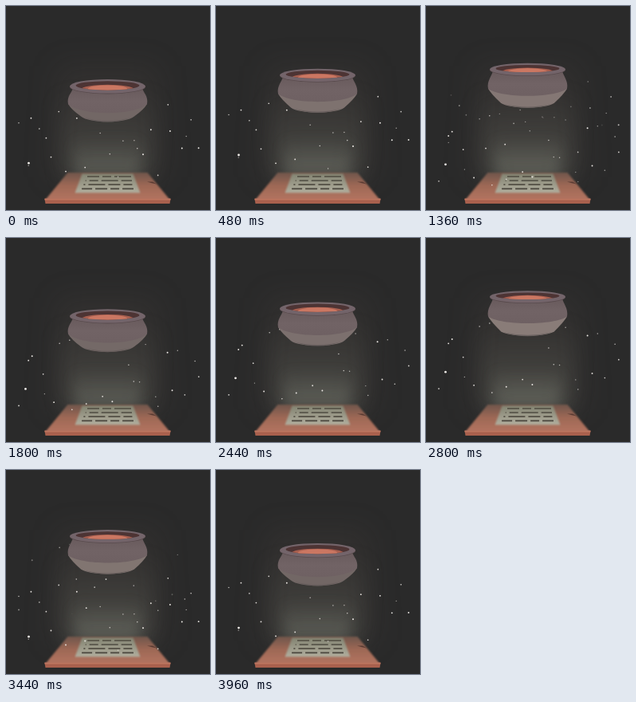
An HTML page with a canvas that plays this animation: 256 by 256 pixels, repeating every 4000 ms.

```html
<!DOCTYPE html>
<html lang="en">
<head>
<meta charset="utf-8">
<title>Floating pot</title>
<style>
html, body { margin: 0; width: 100%; height: 100%; overflow: hidden; background: #2a2a2a; }
canvas { display: block; width: 100vw; height: 100vh; }
</style>
</head>
<body>
<canvas id="stage" width="256" height="256"></canvas>
<script>
const ctx = document.getElementById('stage').getContext('2d');
const LOOP = 4000, STEP = 40, CX = 127.5;
const RISE = 21.3 / 1000; // spark speed in px per ms
const TAU = Math.PI * 2;

const lerp = (a, b, k) => a + (b - a) * k;
const clamp = v => Math.max(0, Math.min(1, v));
const mix = (a, b, k) => `rgb(${a.map((v, i) => Math.round(lerp(v, b[i], k)))})`;

function seeded(seed) {
  return () => {
    seed = (seed * 1664525 + 1013904223) >>> 0;
    return seed / 2 ** 32;
  };
}

// One bright leader, the rest spread evenly across the stage at random heights.
function makeSwarm(birth, seed, leaderX, leaderY, count = 28) {
  const rand = seeded(seed);
  const dots = Array.from({ length: count }, (_, i) => ({
    x: 14 + (i + rand()) * 232 / count,
    y: lerp(142, 236, rand()),
    size: lerp(0.65, 1, rand()),
    late: rand()
  }));
  dots.push({ x: leaderX, y: leaderY, size: 1.4, late: 0 });
  return { birth, dots };
}
const swarms = [makeSwarm(3000, 11, 28.5, 218.5), makeSwarm(1000, 29, 24.5, 206.5)];

function poly(fill, ...p) {
  ctx.beginPath();
  for (let i = 0; i < p.length; i += 2) ctx.lineTo(p[i], p[i + 1]);
  ctx.closePath();
  ctx.fillStyle = fill;
  ctx.fill();
}

// A symmetric trapezoid around the centre line.
function slab(fill, y0, half0, y1, half1) {
  poly(fill, CX - half0, y0, CX + half0, y0, CX + half1, y1, CX - half1, y1);
}

function ellipse(y, rx, ry, fill) {
  ctx.beginPath();
  ctx.ellipse(CX, y, rx, ry, 0, 0, TAU);
  ctx.fillStyle = fill;
  ctx.fill();
}

function vertical(y0, y1, ...colors) {
  const g = ctx.createLinearGradient(0, y0, 0, y1);
  colors.forEach((c, i) => g.addColorStop(i / (colors.length - 1), c));
  return g;
}

function blurred(px, draw) {
  ctx.save();
  ctx.filter = `blur(${px}px)`;
  draw();
  ctx.restore();
}

function drawHaze() {
  blurred(18, () => slab('rgba(112,92,84,.13)', 75, 62, 215, 72));
}

function drawBeam(k) {
  const light = a => `rgba(142,146,132,${a * lerp(0.85, 1, k)})`;
  blurred(13, () => slab(vertical(105, 215, light(0), light(0.15), light(0.36)), 105, 65, 218, 50));
  blurred(8, () => slab(vertical(165, 212, light(0), light(0.32)), 165, 44, 213, 38));
}

function drawBoard() {
  blurred(1.2, () => slab(vertical(207, 243, '#69534a', '#9d6855', '#b37460'), 209, 50, 243, 78));
  slab('#a9604d', 242, 79, 248, 78);
  slab('#bd7661', 241.5, 79, 243.5, 79);
  poly('#5a3b33', 177, 220.5, 184, 220.5, 189, 223.5, 183, 222.2);

  blurred(1.2, () => slab(vertical(209, 235, '#80816f', '#b2af9f'), 210.5, 32, 234.5, 41));
  ctx.save();
  ctx.lineWidth = 1.8;
  ctx.setLineDash([15, 4, 11, 4, 21, 4]);
  for (let row = 0; row < 4; row++) {
    const y = 214 + row * 5.1;
    ctx.lineDashOffset = row * 14;
    ctx.strokeStyle = `rgba(65,60,52,${0.6 + row * 0.1})`;
    ctx.beginPath();
    ctx.moveTo(102 - row * 2.3, y);
    ctx.lineTo(157 + row, y);
    ctx.stroke();
  }
  ctx.restore();
}

function drawSparks(t) {
  ctx.fillStyle = '#f2eeea';
  for (const { birth, dots } of swarms) {
    const age = (t - birth + LOOP) % LOOP;
    for (const { x, y, size, late } of dots) {
      const alpha = clamp((age - late * 200) / 250) * clamp((2300 + late * 400 - age) / 250);
      if (!alpha) continue;
      ctx.globalAlpha = alpha * Math.min(1, size);
      ctx.beginPath();
      ctx.arc(x, y - age * RISE, size, 0, TAU);
      ctx.fill();
    }
  }
  ctx.globalAlpha = 1;
}

function drawPot(k) {
  const ry = lerp(8.8, 7.4, k);
  const rim = lerp(92, 63.5, k) + ry;
  const crease = lerp(123, 96, k);
  const sag = lerp(15, 11, k);
  const bottom = lerp(146.5, 121, k);
  const foot = bottom - lerp(7, 5, k);

  // Underside
  ctx.beginPath();
  ctx.moveTo(78, crease);
  ctx.quadraticCurveTo(82, crease + 7, 94, foot - 1);
  ctx.bezierCurveTo(104, bottom + 1, 151, bottom + 1, 161, foot - 1);
  ctx.quadraticCurveTo(173, crease + 7, 177, crease);
  ctx.closePath();
  ctx.fillStyle = mix([114, 103, 101], [139, 126, 122], k);
  ctx.fill();

  // Foot
  ctx.beginPath();
  ctx.moveTo(97, foot);
  ctx.quadraticCurveTo(CX, bottom + 5, 158, foot);
  ctx.quadraticCurveTo(CX, bottom + 2, 97, foot);
  ctx.fillStyle = mix([102, 93, 92], [108, 98, 96], k);
  ctx.fill();

  // Belly
  ctx.beginPath();
  ctx.moveTo(84, rim + 2);
  ctx.bezierCurveTo(83, rim + 8, 76, crease - 10, 78, crease);
  ctx.bezierCurveTo(94, crease + sag, 161, crease + sag, 177, crease);
  ctx.bezierCurveTo(179, crease - 10, 172, rim + 8, 171, rim + 2);
  ctx.closePath();
  ctx.fillStyle = vertical(rim, crease + sag, '#67595b', '#716365', '#6e6062');
  ctx.fill();

  // Rim, opening and soup
  const opening = rim - 1, depth = ry - 3.2;
  ellipse(rim + 0.8, 47.5, ry, '#594b4d');
  ellipse(rim, 47.5, ry, '#73646a');
  ellipse(opening, 40, depth, '#4d3434');
  ctx.save();
  ctx.beginPath();
  ctx.ellipse(CX, opening, 40, depth, 0, 0, TAU);
  ctx.clip();
  ellipse(opening + 4.6, 33, 5.6, '#a85f4f');
  ellipse(opening + 4.4, 25, 4.8, '#cb7762');
  ctx.restore();
}

function render(t) {
  const k = (1 - Math.cos(t / 2000 * TAU)) / 2; // 0 at the lowest point, 1 at the highest
  ctx.fillStyle = '#2a2a2a';
  ctx.fillRect(0, 0, 256, 256);
  drawHaze();
  drawBeam(k);
  drawBoard();
  drawSparks(t);
  drawPot(k);
}

const start = performance.now();
function tick() {
  const t = (performance.now() - start) % LOOP;
  render(Math.floor(t / STEP) * STEP);
  requestAnimationFrame(tick);
}
tick();
</script>
</body>
</html>
```
